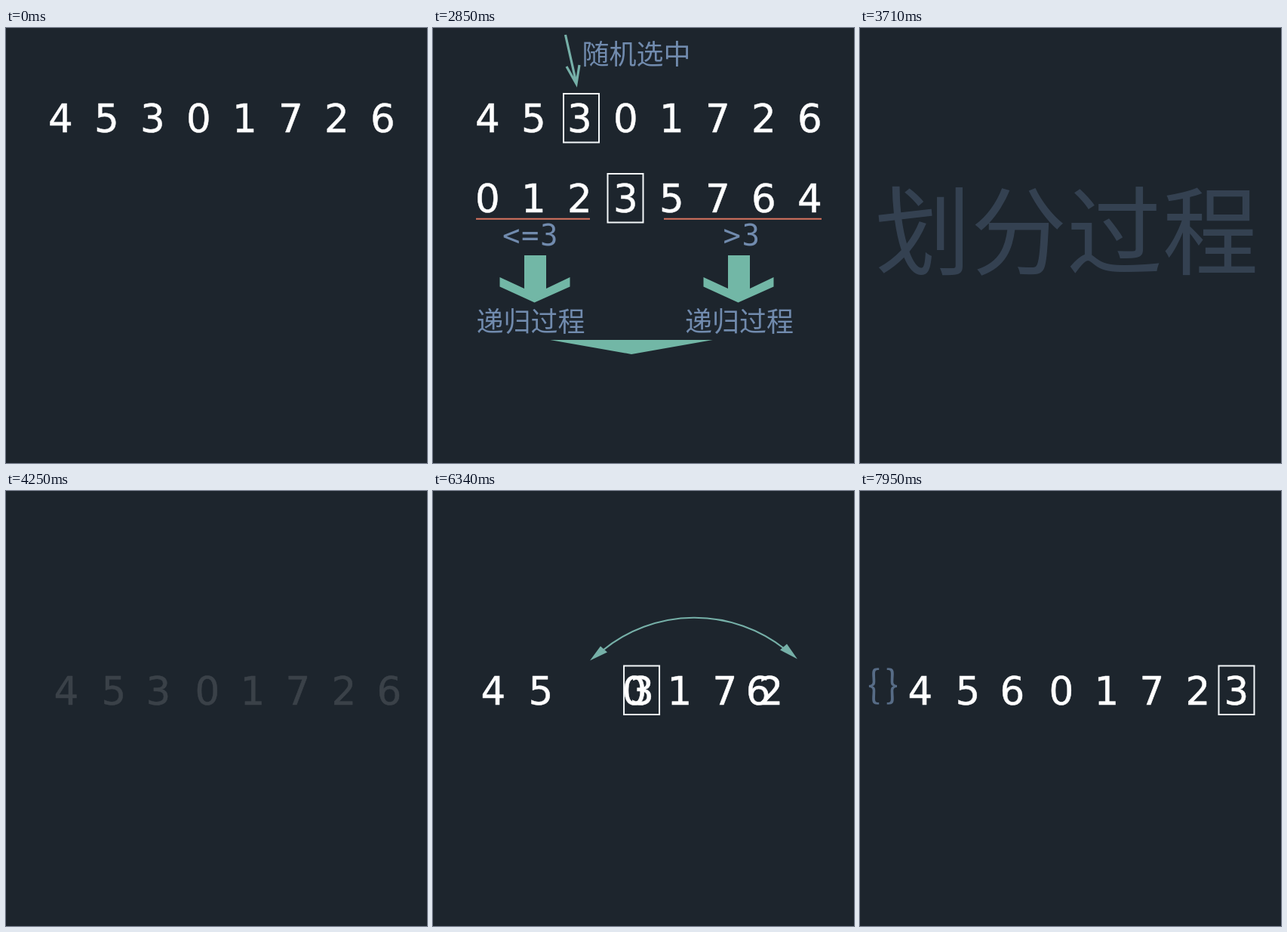
An HTML page for the animation above (8 s loop, 558 by 576 pixels).

```html
<!DOCTYPE html>
<html lang="zh">
<head>
<meta charset="utf-8">
<title>快速排序</title>
<style>
  html, body { margin: 0; width: 100%; height: 100%; overflow: hidden; background: #1d252d; }
  svg { display: block; width: 558px; height: 576px; }
  text { font-family: "Noto Sans CJK SC", "Noto Sans CJK", "Noto Sans", sans-serif; text-anchor: middle; }
  .digit { font-family: "DejaVu Sans", sans-serif; font-size: 51.5px; fill: #fff; stroke: #fff; stroke-width: .5; }
  .label { font-size: 36px; fill: #718bae; }
  .note { font-family: "DejaVu Sans Mono", monospace; font-size: 39px; letter-spacing: 1.5px; }
  .title { font-size: 127px; }
  .brace { font-size: 50px; }
  .frame { fill: none; stroke: #f4f8fa; stroke-width: 2; }
  .rule { stroke: #d9745f; stroke-width: 2; }
  .fill { fill: #72b7a6; }
  .line { fill: none; stroke: #76b0a8; stroke-width: 2.4; }
</style>
</head>
<body>
<svg viewBox="0 0 558 576">
  <defs>
    <clipPath id="smallClip"><rect y="296" width="558" height="72"/></clipPath>
    <clipPath id="bigClip"><rect y="413" width="558" height="80"/></clipPath>
    <path id="down" class="fill" d="M-13.500 301H15.500V345L47 330V342.500L0 363.500L-46 342.500V330L-13.500 345Z"/>
  </defs>

  <g id="overview">
    <g id="input"></g>
    <g id="pick">
      <path class="line" style="stroke-width:3.2" d="M175.500 9L190 73M177 51L190 74L194 49"/>
      <text class="label" x="269.500" y="47.500">随机选中</text>
      <rect class="frame" x="173" y="87" width="47" height="64.500"/>
    </g>
    <g id="left">
      <rect class="frame" x="231.500" y="193" width="47" height="64.500"/>
    </g>
    <g id="leftNote">
      <path class="rule" d="M57 252.700H208"/>
      <text class="label note" x="129.500" y="287.500">&lt;=3</text>
    </g>
    <g id="right">
      <path class="rule" d="M306 252.700H515"/>
      <text class="label note" x="409.500" y="287.500">&gt;3</text>
    </g>
    <g clip-path="url(#smallClip)">
      <g id="smallArrows"><use href="#down" x="134.500"/><use href="#down" x="404.500"/></g>
    </g>
    <g id="recursion">
      <text class="label" x="129.500" y="401.500">递归过程</text>
      <text class="label" x="406" y="401.500">递归过程</text>
    </g>
    <g clip-path="url(#bigClip)">
      <path id="bigArrow" class="fill" d="M226 425H304V469L388 454V466L263 488L138 466V454L226 469Z"/>
    </g>
    <g id="sorted"></g>
  </g>

  <text id="title" class="label title" x="274" y="317">划分过程</text>

  <g id="partition">
    <g id="arc">
      <path class="line" style="stroke-width:2.2" d="M225 211A193 193 0 0 1 466 209"/>
      <path class="fill" style="fill:#76b0a8" d="M208 224.500L222 205.500L231 213.500ZM483 222.500L460 210.500L469 202.500Z"/>
    </g>
    <g id="pivot"><rect id="pivotFrame" class="frame" x="-23.500" y="231.500" width="47" height="64.500"/></g>
    <g id="last"></g>
  </g>
  <g id="braces">
    <text class="label brace" x="18.500" y="274">{</text>
    <text class="label brace" x="42.500" y="274">}</text>
  </g>
</svg>
<script>
const LOOP = 8000;
const $ = id => document.getElementById(id);

function addDigits(id, digits, baseline, xAt) {
  [...digits].forEach((digit, i) => {
    if (digit === ' ') return;
    const text = document.createElementNS('http://www.w3.org/2000/svg', 'text');
    text.setAttribute('class', 'digit');
    text.setAttribute('x', xAt(i));
    text.setAttribute('y', baseline);
    text.textContent = digit;
    $(id).append(text);
  });
}

const column = i => 72.5 + 61 * i;
const slots = [80, 143, 202, 267, 327, 387, 448, 508];
addDigits('input', '45301726', 137.5, column);
addDigits('left', '0123', 243.5, column);
addDigits('right', '    5764', 243.5, column);
addDigits('sorted', '01234567', 550, column);
addDigits('partition', '45 0172', 283, i => slots[i]);
addDigits('pivot', '3', 283, () => 0);
addDigits('last', '6', 283, () => 0);

// id: fade-in start and end, then optional fade-out start and end
const fades = {
  overview: [-1, 0, 3200, 3460],
  pick: [400, 900],
  left: [1090, 1410],
  leftNote: [1375, 1510],
  right: [1630, 1960],
  recursion: [2220, 2560],
  sorted: [2980, 3210],
  title: [3590, 4020, 4249, 4250],
  partition: [4185, 4690],
  pivotFrame: [4740, 5130],
  arc: [5770, 6050, 7300, 7500],
  braces: [7540, 8130]
};

const ramp = (t, from, to) => Math.min(1, Math.max(0, (t - from) / (to - from)));
const smooth = p => p * p * (3 - 2 * p);
const move = (id, x, y) => $(id).setAttribute('transform', `translate(${x} ${y})`);

function draw(t) {
  for (const [id, [inFrom, inTo, outFrom, outTo]] of Object.entries(fades)) {
    const out = outTo ? ramp(t, outFrom, outTo) : 0;
    $(id).setAttribute('opacity', ramp(t, inFrom, inTo) * (1 - out));
  }
  move('smallArrows', 0, -72 * (1 - ramp(t, 1930, 2240)));
  move('bigArrow', 0, -75 * (1 - ramp(t, 2760, 3120)));
  const swap = smooth(ramp(t, 6006, 7030));
  move('pivot', 202 + 297 * swap, 0);
  move('last', 508 - 306 * swap, 0);
}

const start = performance.now();
function tick() {
  draw((performance.now() - start) % LOOP);
  requestAnimationFrame(tick);
}
tick();
</script>
</body>
</html>
```
